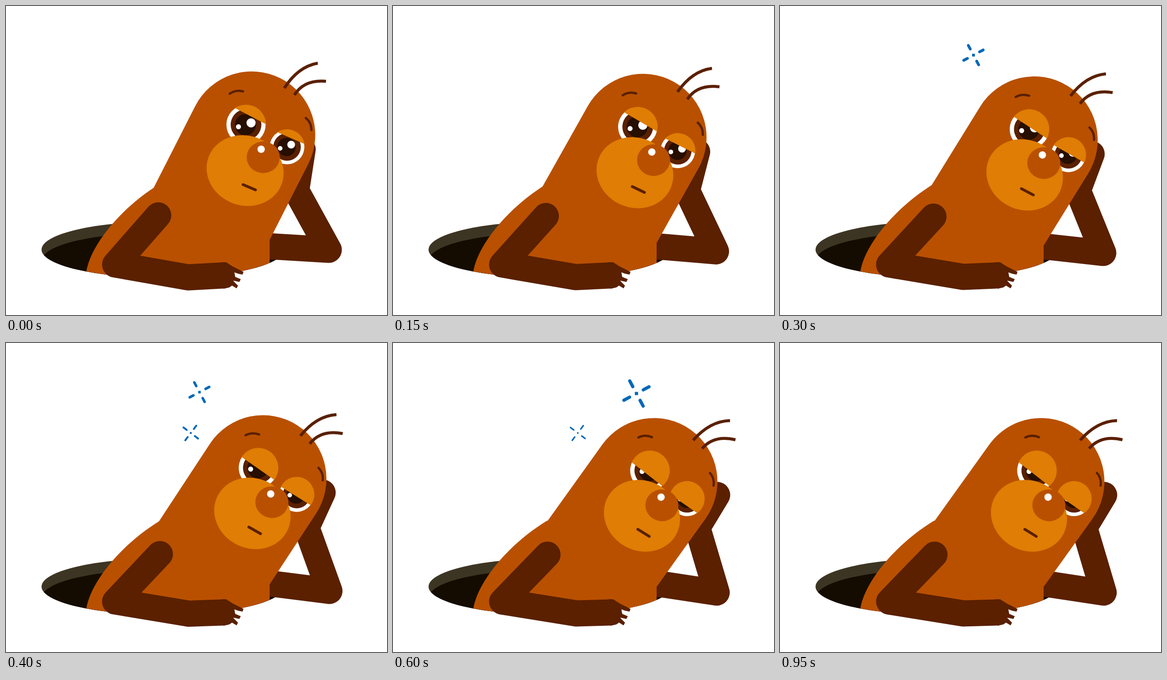
Animation of 831x673 px, one loop 1 s. Source, as an HTML page:

```html
<!DOCTYPE html>
<html lang="en">
<head>
<meta charset="utf-8">
<title>Sleepy mole</title>
<style>
  html, body { margin: 0; width: 100%; height: 100%; overflow: hidden; background: #fff; }
  svg { display: block; width: 100%; height: 100%; }
  .line { fill: none; stroke: #5a2000; }
  .arm { stroke-width: 57; stroke-linecap: round; stroke-linejoin: round; }
  .hair { stroke-width: 6.5; }
  .brow { stroke-width: 5; stroke-linecap: round; }
  .skin { fill: #b95000; stroke: #b95000; stroke-width: 0; }
  .tan { fill: #df7d04; }
  .iris { fill: #5a2000; }
  .pupil { fill: #260e00; }
  .white { fill: #fff; }
  #sparks { fill: #0068b8; stroke: #0068b8; stroke-linecap: round; }
</style>
</head>
<body>
<svg viewBox="0 0 831 673">
  <defs>
    <clipPath id="hole"><ellipse cx="342" cy="530.5" rx="264.5" ry="61.5"/></clipPath>
    <clipPath id="above"><path d="M0 0H831V530H575V559.5A264.5 61.5 0 0 1 77.5 530.5L0 530Z"/></clipPath>
    <clipPath id="eyeL"><circle r="43.5"/></clipPath>
    <clipPath id="eyeR"><circle r="38.5"/></clipPath>
  </defs>

  <g clip-path="url(#hole)">
    <rect x="70" y="460" width="550" height="140" fill="#3d3523"/>
    <ellipse cx="342" cy="554" rx="264" ry="61" fill="#140c00"/>
  </g>

  <path id="backArm" class="line arm"/>

  <g clip-path="url(#above)">
    <path class="skin" d="M174 590C176 530 247 441 336 387L480 400 575 508V600H174Z"/>
    <g class="head">
      <path class="skin" d="M536 281L427 495" style="stroke-width:277" stroke-linecap="round"/>
    </g>
  </g>

  <g class="head">
    <path class="line hair" d="M607 179Q637 132 680 124.5M629 194Q650 160 698 164"/>
    <path class="line brow" d="M488 191Q501 182 517 186M654 244Q666 254 666 270"/>

    <g transform="translate(523.5 258.5)"><g clip-path="url(#eyeL)">
      <circle class="white" r="42.8"/>
      <circle class="iris" r="33.5"/>
      <circle class="pupil" cx="-1" r="23"/>
      <circle class="white" cx="11" cy="-4" r="10"/>
      <circle class="white" cx="-16.5" cy="4.5" r="5.5"/>
      <rect id="lidL" class="tan" x="-60" y="-120" width="120" height="120"/>
    </g></g>

    <g transform="translate(613 307)"><g clip-path="url(#eyeR)">
      <circle class="white" r="37.8"/>
      <circle class="iris" r="30"/>
      <circle class="pupil" cx="-1" r="20"/>
      <circle class="white" cx="9" cy="-5" r="8.5"/>
      <circle class="white" cx="-15" cy="3" r="5"/>
      <rect id="lidR" class="tan" x="-60" y="-120" width="120" height="120"/>
    </g></g>

    <ellipse class="tan" rx="85" ry="76" transform="translate(521.5 358.5) rotate(20)"/>
    <ellipse class="skin" cx="561" cy="329.5" rx="36" ry="34.5"/>
    <circle class="white" cx="556.5" cy="312" r="8"/>
    <path class="line" d="M517 389L544 400.5" stroke-width="6" stroke-linecap="round"/>
  </g>

  <path id="frontArm" class="line arm"/>
  <path class="iris" d="M470 558L480 558 494 567 518 579 516 585 506 583 498 580 500 590 512 595 509 601 495 598 506 609 503 615 493 609 487 613 474 616Z"/>
  <g id="sparks"></g>
</svg>

<script>
const $ = id => document.getElementById(id);
const heads = document.querySelectorAll('.head');
const LOOP = 1000, STEP = 50, DROOP = 550;

const mix = (a, b, p) => a + (b - a) * p;
const point = (x0, y0, x1, y1, p) => `${mix(x0, x1, p)} ${mix(y0, y1, p)}`;

const sparks = [
  { x: 422, y: 107, inner: 15, outer: 24, turn: -28, from: 300, to: 500, w0: 6, w1: 5 },
  { x: 403, y: 196, inner: 11, outer: 20, turn: 37, from: 350, to: 850, w0: 4.2, w1: 2.4 },
  { x: 531, y: 110, inner: 17, outer: 31, turn: -28, from: 600, to: 900, w0: 7, w1: 6 }
];

function drawSpark(s, t) {
  if (t < s.from || t >= s.to) return '';
  const w = mix(s.w0, s.w1, (t - s.from) / (s.to - s.from));
  const rays = [0, 90, 180, 270].map(a =>
    `<path d="M${s.inner} 0H${s.outer}" transform="rotate(${a + s.turn})"/>`).join('');
  return `<g transform="translate(${s.x} ${s.y})" stroke-width="${w}">${rays}` +
    `<rect x="${-w / 2}" y="${-w / 2}" width="${w}" height="${w}" stroke="none"/></g>`;
}

function setLid(id, angle0, angle1, drop0, drop1, p) {
  $(id).setAttribute('transform',
    `rotate(${mix(angle0, angle1, p)}) translate(0 ${mix(drop0, drop1, p)})`);
}

function draw(t) {
  const p = Math.min(1, t / DROOP);
  heads.forEach(h => h.setAttribute('transform', `rotate(${8.7 * p} 415 509)`));
  setLid('lidL', 27.5, 29, -21, 10, p);
  setLid('lidR', 23.5, 26, -21, 13, p);
  $('backArm').setAttribute('d', 'M570 523L' + [
    point(704, 531, 706, 543.5, p),
    point(633, 402, 664, 402, p),
    point(647, 312, 707, 331, p)
  ].join(' '));
  $('frontArm').setAttribute('d', 'M' + [
    point(332, 456, 337, 461, p) + 'L238 563',
    point(397, 591, 400, 589, p),
    '470 587'
  ].join(' '));
  $('sparks').innerHTML = sparks.map(s => drawSpark(s, t)).join('');
}

const start = performance.now();
function tick() {
  const t = (performance.now() - start) % LOOP;
  draw(Math.floor(t / STEP) * STEP);
  requestAnimationFrame(tick);
}
tick();
</script>
</body>
</html>
```
